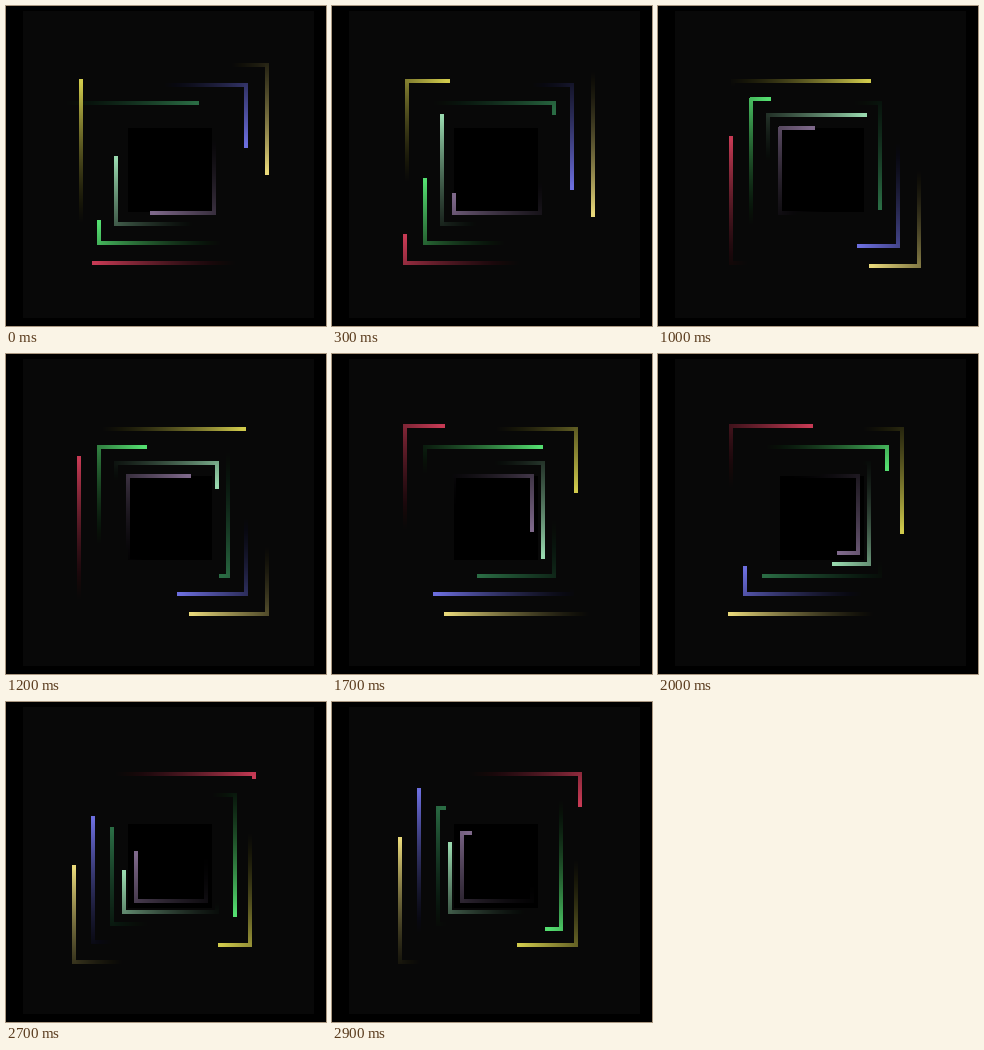
Write an HTML page with a canvas that moves like this. It is 320 by 320 pixels and loops after 3000 ms.

```html
<!DOCTYPE html>
<html>
<head>
<meta charset="utf-8">
<title>Spiralling light trails</title>
<style>
  html, body { margin: 0; height: 100%; overflow: hidden; background: #000; }
  canvas { display: block; width: 320px; height: 320px; }
</style>
</head>
<body>
<canvas id="stage" width="320" height="320"></canvas>
<script>
const ctx = document.getElementById('stage').getContext('2d');
const LOOP = 3000, STEP = 100, TAIL = 165, WIDTH = 4;

// Route, head distance at the start, pixels per step, head colour
const trails = [
  ['M150 59H261V260H68V60', 221, 14.1, [232, 216, 122]],
  ['M260 257H73V72H248V140', 174, 14, [198, 58, 84]],
  ['M75 250V75H244V243H150', 177, 13.6, [208, 202, 76]],
  ['M100 79H240V240H87V70', 203, 13.95, [108, 110, 222]],
  ['M250 237H93V93H229V227H180', 180, 14.05, [84, 222, 112]],
  ['M60 97H222V222H106V106H140', 133, 13.6, [42, 108, 68]],
  ['M200 218H110V109H211V210H118V100', 158, 14, [152, 216, 174]],
  ['M108 112H208V207H122V122H200V199H130V131H160', 259, 14.15, [126, 104, 138]]
].map(([d, start, speed, color]) => {
  const path = document.createElementNS('http://www.w3.org/2000/svg', 'path');
  path.setAttribute('d', d);
  return { path, start, speed, color };
});

function drawTrail({ path, start, speed, color }, step) {
  const head = start + speed * step - WIDTH / 2;
  for (let back = Math.min(TAIL, head); back >= 0; back--) {
    const glow = (1 - back / TAIL) ** 1.7;
    const { x, y } = path.getPointAtLength(head - back);
    ctx.fillStyle = `rgb(${color.map(c => Math.round(c * glow))})`;
    ctx.fillRect(Math.round(x) - WIDTH / 2, Math.round(y) - WIDTH / 2, WIDTH, WIDTH);
  }
}

function fillBox(color, x, y, w, h) {
  ctx.fillStyle = color;
  ctx.fillRect(x, y, w, h);
}

function draw(step) {
  ctx.globalCompositeOperation = 'source-over';
  fillBox('#000', 0, 0, 320, 320);
  fillBox('#080808', 17, 5, 291, 307);
  fillBox('#000', 122, 122, 84, 84);
  ctx.globalCompositeOperation = 'lighten';
  trails.forEach(trail => drawTrail(trail, step));
}

let shown = -1;
function tick() {
  const step = Math.floor(performance.now() % LOOP / STEP);
  if (step !== shown) draw(shown = step);
  requestAnimationFrame(tick);
}
tick();
</script>
</body>
</html>
```
